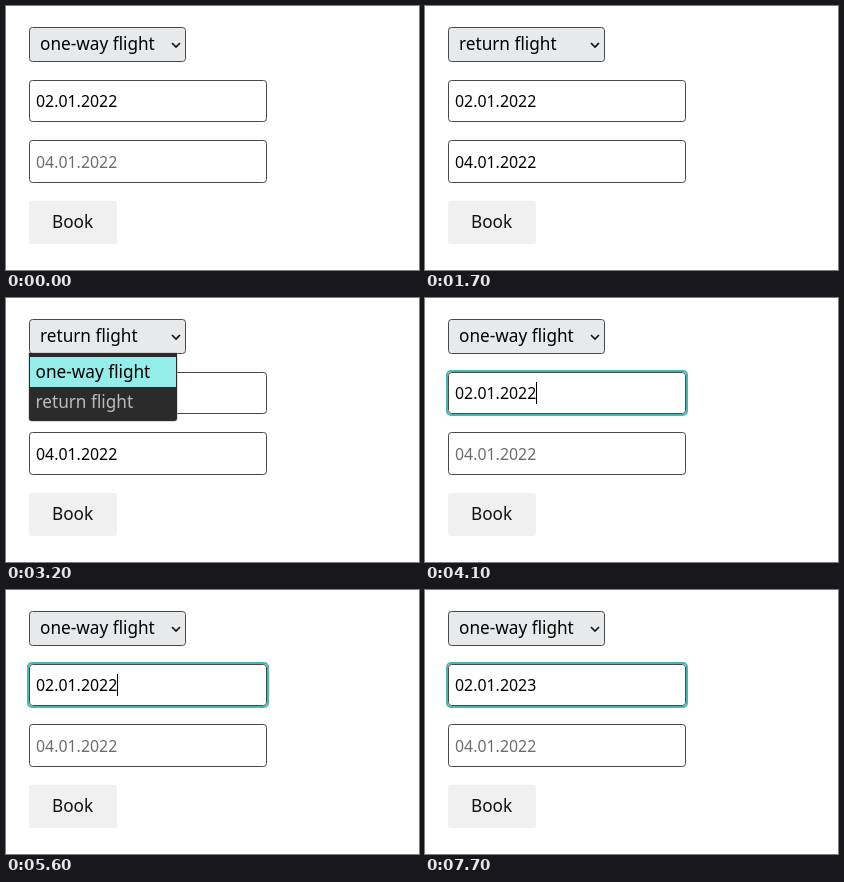
These frames come from a looping animation (413 px wide and 264 px high, 8000 ms). An HTML page:

```html
<!DOCTYPE html>
<html lang="en">
<head>
<meta charset="utf-8">
<title>Flight booker</title>
<style>
  html, body { margin: 0; width: 100%; height: 100%; overflow: hidden; background: #fff; }
  svg { display: block; width: 413px; height: 264px; }
  text { font: 17.2px "Noto Sans", "Open Sans", sans-serif; fill: #000; white-space: pre; }
  .date { font-size: 15.9px; }
  .field { fill: #fff; stroke: #484848; }
</style>
</head>
<body>
<svg viewBox="0 0 413 264">
  <rect class="field" x="23.5" y="21.5" width="156" height="34" rx="3" style="fill:#e8e9ea"/>
  <text id="choice" x="34" y="44"></text>
  <path d="M166 37l4 4 4-4" fill="none" stroke="#111" stroke-width="1.6"/>

  <rect id="ring" x="22" y="73" width="240" height="44" rx="4" fill="none" stroke="#48b5b7" stroke-width="2"/>
  <rect id="start" class="field" x="23.5" y="74.5" width="237" height="41" rx="3"/>
  <text id="startText" class="date" x="30" y="101"></text>
  <rect id="caret" y="84" width="1" height="22"/>

  <rect class="field" x="23.5" y="134.5" width="237" height="42" rx="3"/>
  <text id="endText" class="date" x="30" y="162">04.01.2022</text>

  <rect x="23" y="195" width="88" height="43" rx="3" fill="#f0f0f0"/>
  <text x="46" y="222" style="fill:#111">Book</text>

  <g id="menu">
    <path d="M22.5 54.5h149v66q0 3-3 3h-143q-3 0-3-3z" fill="#bbb"/>
    <path d="M23 55h148v65q0 3-3 3h-142q-3 0-3-3z" fill="#2b2b2b"/>
    <rect id="mark" x="24" width="146" height="30" fill="#94ede8"/>
    <text id="item0" x="29.5" y="80">one-way flight</text>
    <text id="item1" x="29.5" y="110">return flight</text>
  </g>
</svg>
<script>
const LOOP = 8000;
const OPTIONS = ["one-way flight", "return flight"];

// Each step lists only what changes. menu is the highlighted row, -1 when closed.
const steps = [
  [0, { choice: 0, menu: -1, focus: false, caret: false, date: "02.01.2022" }],
  [600, { menu: 0 }],
  [1100, { menu: 1 }],
  [1600, { menu: -1 }],
  [1700, { choice: 1 }],
  [2900, { menu: 1 }],
  [3200, { menu: 0 }],
  [3400, { menu: -1, choice: 0 }],
  [4100, { focus: true, caret: true }],
  [4800, { date: "02.01.202" }],
  [5300, { caret: false }],
  [5600, { date: "02.01.2022", caret: true }],
  [6500, { caret: false }],
  [7200, { date: "02.01.202", caret: true }],
  [7300, { date: "02.01.2023" }],
  [7700, { caret: false }]
];

const el = id => document.getElementById(id);
const show = (id, on) => el(id).style.display = on ? "" : "none";

function draw(s) {
  const valid = s.date.length === 10;
  el("choice").textContent = OPTIONS[s.choice];
  el("startText").textContent = s.date;
  el("start").style.fill = valid ? "#fff" : "#f00";
  el("endText").style.fill = s.choice ? "#000" : "#6d6d6d";
  el("caret").setAttribute("x", valid ? 111 : 103);
  el("caret").style.fill = valid ? "#000" : "#700000";
  show("ring", s.focus);
  show("caret", s.caret);
  show("menu", s.menu >= 0);
  el("mark").setAttribute("y", s.menu === 1 ? 89 : 59);
  OPTIONS.forEach((_, i) => el("item" + i).style.fill = i === s.menu ? "#000" : "#bcbcbc");
}

const origin = performance.now();
let shown = -1;

function tick() {
  const t = (performance.now() - origin) % LOOP;
  const count = steps.filter(([at]) => at <= t).length;
  if (count !== shown) {
    shown = count;
    draw(Object.assign({}, ...steps.slice(0, count).map(([, change]) => change)));
  }
  requestAnimationFrame(tick);
}
tick();
</script>
</body>
</html>
```
